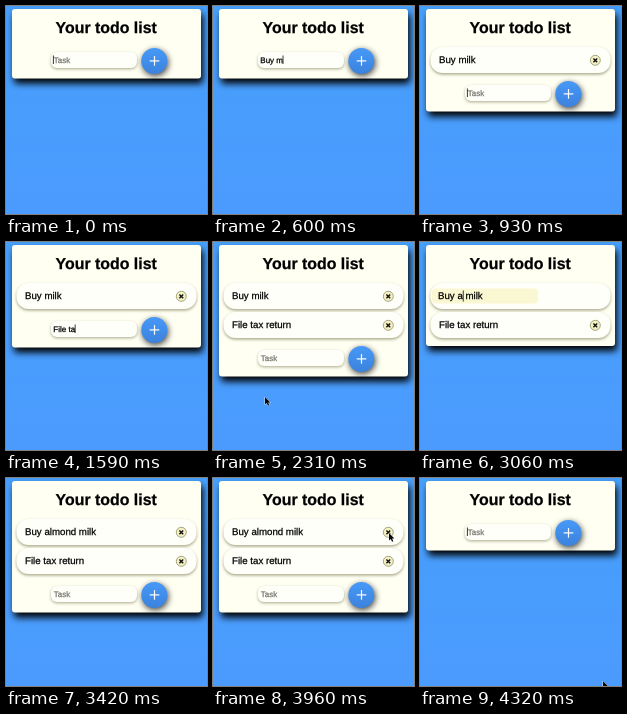
An HTML page with a canvas for the animation above (4350 ms loop, 201 by 208 pixels).

```html
<!DOCTYPE html>
<html lang="en">
<head>
<meta charset="utf-8">
<title>Todo list</title>
<style>
html, body { margin: 0; width: 100%; height: 100%; overflow: hidden; background: #4a9dfd; }
canvas { display: block; width: 201px; height: 208px; }
</style>
</head>
<body>
<canvas id="stage"></canvas>
<script>
const W = 201, H = 208, LOOP = 4350;
const FONT = '"Liberation Sans", Arial, sans-serif';
const canvas = document.getElementById('stage');
const ctx = canvas.getContext('2d');
const dpr = window.devicePixelRatio || 1;
canvas.width = Math.round(W * dpr);
canvas.height = Math.round(H * dpr);
ctx.textRendering = 'geometricPrecision';

// Key moments in ms
const ADD_1 = 900, ADD_2 = 2130;
const EDIT_START = 2520, EDIT_END = 3390;
const DELETE_1 = 4020, DELETE_2 = 4140;

// Pointer keys: time, x, y
const POINTER_RUNS = [
  [[1710, 141, 158], [1770, 136, 159], [2160, 56, 159], [2310, 52, 155], [2370, 50, 137], [2500, 37, 53], [2970, 35, 53]],
  [[3510, 37, 53], [3600, 56, 62], [3900, 175, 55], [3960, 176, 55], [4150, 176, 55], [4310, 183, 203], [4350, 183, 203]]
];

const typed = (text, start, step, t) =>
  t < start ? '' : text.slice(0, Math.floor((t - start) / step) + 1);

function shadow(color, blur, x, y) {
  ctx.shadowColor = color;
  ctx.shadowBlur = blur * dpr;
  ctx.shadowOffsetX = x * dpr;
  ctx.shadowOffsetY = y * dpr;
}

function box(x, y, w, h, r, fill, shade) {
  ctx.save();
  if (shade) shadow(...shade);
  ctx.fillStyle = fill;
  ctx.beginPath();
  ctx.roundRect(x, y, w, h, r);
  ctx.fill();
  ctx.restore();
}

function vertical(top, bottom, from, to) {
  const fill = ctx.createLinearGradient(0, top, 0, bottom);
  fill.addColorStop(0, from);
  fill.addColorStop(1, to);
  return fill;
}

// The thin outline gives the text a slightly heavier weight
function label(text, x, y, size, color = '#000', weight = 'normal', align = 'left') {
  ctx.font = `${weight} ${size}px ${FONT}`;
  ctx.textAlign = align;
  ctx.fillStyle = ctx.strokeStyle = color;
  ctx.lineWidth = 0.25;
  ctx.fillText(text, x, y);
  ctx.strokeText(text, x, y);
  return ctx.measureText(text).width;
}

function caret(x, y, h) {
  ctx.fillStyle = '#222';
  ctx.fillRect(x, y, 0.9, h);
}

function cross(x, y, r, width, color) {
  ctx.strokeStyle = color;
  ctx.lineWidth = width;
  ctx.beginPath();
  ctx.moveTo(x - r, y - r);
  ctx.lineTo(x + r, y + r);
  ctx.moveTo(x + r, y - r);
  ctx.lineTo(x - r, y + r);
  ctx.stroke();
}

function row(text, y, edit) {
  box(10.5, y - 13, 180, 26, 12, '#fffffa', ['rgba(60,60,10,.45)', 3, 0, 1.5]);
  if (edit) {
    box(12, y - 7.5, 106, 15, 4, '#faf8d2');
    label(text, 18, y + 3.2, 9.7);
    caret(18 + ctx.measureText(edit).width, y - 5.5, 11);
    return;
  }
  label(text, 19, y + 3.2, 9.7);
  ctx.beginPath();
  ctx.arc(175.3, y + 0.3, 5, 0, 7);
  ctx.fillStyle = '#f4f1c4';
  ctx.fill();
  ctx.strokeStyle = '#8f8d68';
  ctx.lineWidth = 0.8;
  ctx.stroke();
  cross(175.3, y + 0.3, 1.9, 1.4, '#111');
}

function form(text, y, focused) {
  box(45, y - 8, 86, 16, 6, '#fffffa', ['rgba(60,60,10,.4)', 3, 0, 1.2]);
  const w = text ? label(text, 47.3, y + 2.7, 8) : 0;
  if (!text) label('Task', 47.8, y + 2.5, 8, '#77776c');
  if (focused) caret(46.9 + w, y - 4.5, 8.5);
  const blue = vertical(y - 12, y + 14, '#4799f8', '#3b82dd');
  box(135.3, y - 12, 26, 26, 13, blue, ['rgba(0,0,0,.75)', 6, 1, 2]);
  ctx.fillStyle = '#fff';
  ctx.fillRect(143.7, y + 0.3, 9.6, 1.2);
  ctx.fillRect(147.9, y - 3.9, 1.2, 9.6);
}

function pointerAt(t) {
  for (const run of POINTER_RUNS) {
    for (let i = 1; i < run.length; i++) {
      const [t0, x0, y0] = run[i - 1], [t1, x1, y1] = run[i];
      if (t >= t0 && t < t1) {
        const k = (t - t0) / (t1 - t0);
        return [x0 + (x1 - x0) * k, y0 + (y1 - y0) * k];
      }
    }
  }
  return null;
}

function pointer(x, y) {
  ctx.save();
  ctx.translate(x, y);
  ctx.beginPath();
  [[0, 0], [0, 7.6], [1.8, 6], [3, 8.8], [4.3, 8.2], [3.1, 5.5], [5.4, 5.4]]
    .forEach(p => ctx.lineTo(...p));
  ctx.closePath();
  ctx.lineWidth = 1;
  ctx.strokeStyle = 'rgba(255,255,255,.75)';
  ctx.stroke();
  ctx.fillStyle = '#080808';
  ctx.fill();
  ctx.restore();
}

function tasksAt(t, insert) {
  const tasks = [];
  if (t >= ADD_1 && t < DELETE_1) tasks.push('Buy' + insert + ' milk');
  if (t >= ADD_2 && t < DELETE_2) tasks.push('File tax return');
  return tasks;
}

function draw(t) {
  const insert = typed(' almond', 2970, 60, t);
  const tasks = tasksAt(t, insert);
  const editing = t >= EDIT_START && t < EDIT_END;
  const n = tasks.length;
  const formY = n ? 58 + 29 * n : 54;
  const bottom = editing ? 104 : formY + 18.5;

  ctx.setTransform(dpr, 0, 0, dpr, 0, 0);
  ctx.fillStyle = vertical(0, H, '#469ffb', '#4b9bfe');
  ctx.fillRect(0, 0, W, H);

  box(6, 3, 189, bottom - 3, 3, '#fffff2', ['#000', 7, 2, 5]);
  label('Your todo list', 100.2, 27, 15.9, '#000', 'bold', 'center');
  tasks.forEach((task, i) => row(task, 54 + 29 * i, editing && i === 0 && 'Buy' + insert));

  if (!editing) {
    const text = t < ADD_1 ? typed('Buy milk', 240, 85, t)
      : t < ADD_2 ? typed('File tax return', 1220, 60, t) : '';
    form(text, formY, t < ADD_2 || t >= DELETE_2);
  }

  const pos = pointerAt(t);
  if (pos) pointer(...pos);
}

const begin = performance.now();
function tick() {
  // Hold each picture for one 30 ms step
  const t = (performance.now() - begin) % LOOP;
  draw(Math.floor(t / 30) * 30);
  requestAnimationFrame(tick);
}
tick();
</script>
</body>
</html>
```
